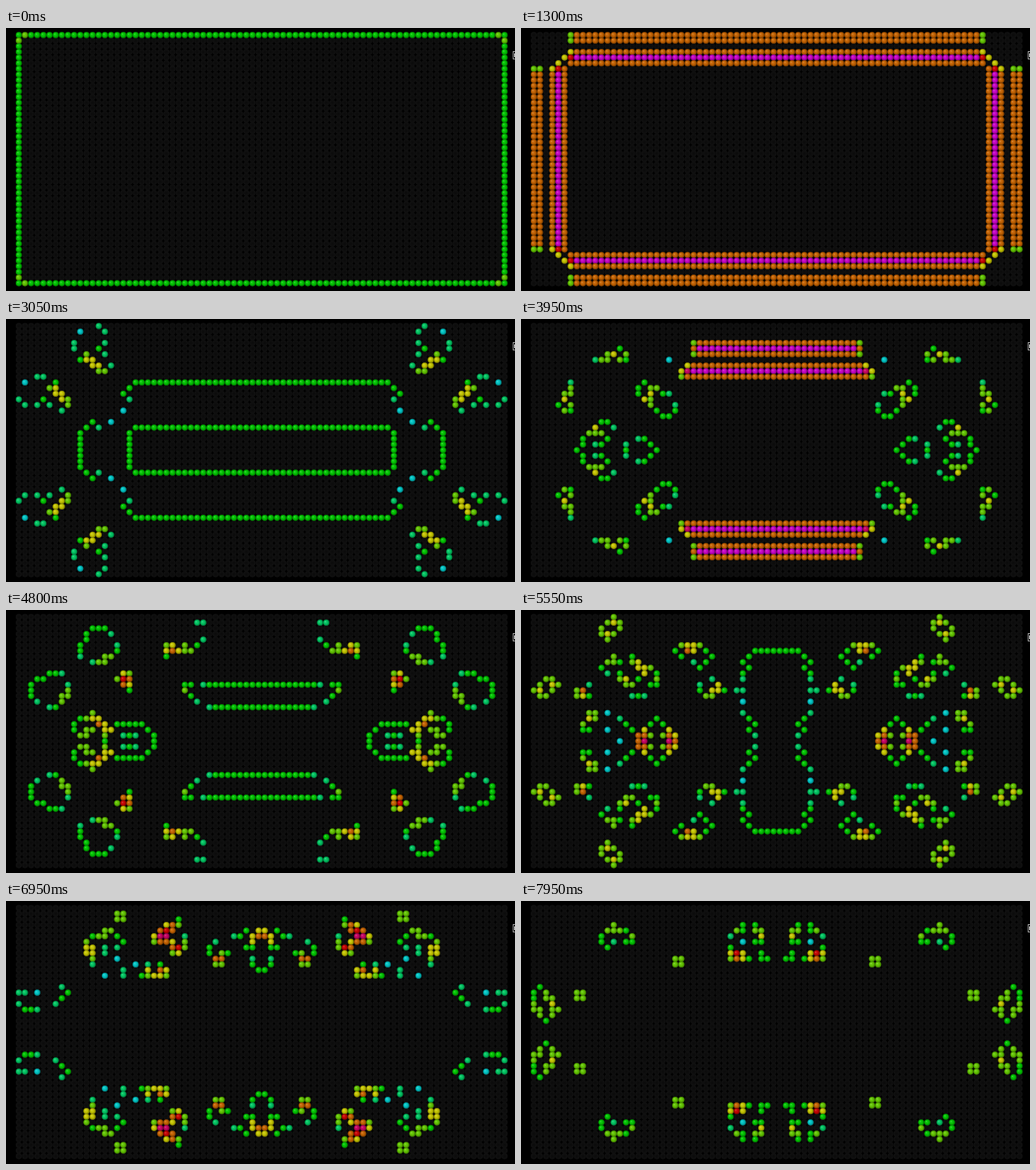
These frames come from a looping animation (680 by 352 pixels, 8000 ms). An HTML page with a canvas:

```html
<!DOCTYPE html>
<html lang="en">
<head>
<meta charset="utf-8">
<title>Game of Life</title>
<style>
  html, body { margin: 0; width: 100%; height: 100%; overflow: hidden; background: #000; }
  canvas { display: block; }
</style>
</head>
<body>
<canvas id="stage" width="680" height="352"></canvas>
<script>
const COLS = 80, ROWS = 45, LAST_GENERATION = 57, LOOP = 8000;
const LEFT = 17.1, TOP = 9.4, STEP_X = 8.215, STEP_Y = 7.55, RADIUS = 4.1;
const ctx = document.getElementById('stage').getContext('2d');

// Start time of each generation; a steady 125 ms beat on a 50 ms clock after a slower start.
const starts = [0, 750, 900, 1050, 1200, 1300, 1450, 1550, 1700, 1800, 1950, 2100, 2250];
for (let n = starts.length; n <= LAST_GENERATION; n++) {
  starts.push(Math.floor((2450 + 125 * (n - 13)) / 50) * 50);
}

function makeGrid(isAlive) {
  return Array.from({ length: ROWS }, (_, y) =>
    Array.from({ length: COLS }, (_, x) => isAlive(x, y) ? 1 : 0));
}

// Cells beyond the edge count as dead.
function countNeighbours(grid, x, y) {
  let sum = -grid[y][x];
  for (let j = Math.max(0, y - 1); j <= Math.min(ROWS - 1, y + 1); j++) {
    for (let i = Math.max(0, x - 1); i <= Math.min(COLS - 1, x + 1); i++) sum += grid[j][i];
  }
  return sum;
}

function evolve(grid) {
  return makeGrid((x, y) => {
    const n = countNeighbours(grid, x, y);
    return n === 3 || (n === 2 && grid[y][x]);
  });
}

const generations = [makeGrid((x, y) => x === 0 || y === 0 || x === COLS - 1 || y === ROWS - 1)];
while (generations.length <= LAST_GENERATION) generations.push(evolve(generations.at(-1)));

function makeShade(focus, stops) {
  const gradient = ctx.createRadialGradient(focus, focus, 0, 0, 0, RADIUS);
  stops.forEach(([offset, color]) => gradient.addColorStop(offset, color));
  return gradient;
}

const liveShade = makeShade(-1.4, [
  [0, 'rgba(255,255,255,0.3)'],
  [0.3, 'rgba(255,255,255,0.04)'],
  [0.65, 'rgba(0,0,0,0.08)'],
  [1, 'rgba(0,0,0,0.42)'],
]);
const deadShade = makeShade(0, [[0, 'rgba(0,0,0,0.4)'], [1, 'rgba(0,0,0,0)']]);

function drawBall(x, y, color, shade) {
  ctx.save();
  ctx.translate(LEFT + x * STEP_X, TOP + y * STEP_Y);
  ctx.beginPath();
  ctx.arc(0, 0, RADIUS, 0, 2 * Math.PI);
  ctx.fillStyle = color;
  ctx.fill();
  ctx.fillStyle = shade;
  ctx.fill();
  ctx.restore();
}

function drawEdgeMark() {
  ctx.strokeStyle = '#aaa';
  ctx.lineWidth = 1;
  ctx.strokeRect(677.5, 31.5, 6, 10);
  ctx.fillStyle = '#fff';
  ctx.fillRect(679, 34, 1, 5);
}

function draw(grid) {
  ctx.fillStyle = '#000';
  ctx.fillRect(0, 0, 680, 352);
  const forEachCell = (alive, paint) => grid.forEach((row, y) =>
    row.forEach((cell, x) => { if (cell === alive) paint(x, y); }));
  forEachCell(0, (x, y) => drawBall(x, y, '#111', deadShade));
  forEachCell(1, (x, y) => {
    const hue = (540 - 30 * countNeighbours(grid, x, y)) % 360;
    drawBall(x, y, `hsl(${hue}, 100%, 39%)`, liveShade);
  });
  drawEdgeMark();
}

let shown = -1;
const origin = performance.now();
function tick() {
  const time = (performance.now() - origin) % LOOP;
  const current = starts.findLastIndex(start => start <= time);
  if (current !== shown) draw(generations[shown = current]);
  requestAnimationFrame(tick);
}
tick();
</script>
</body>
</html>
```
